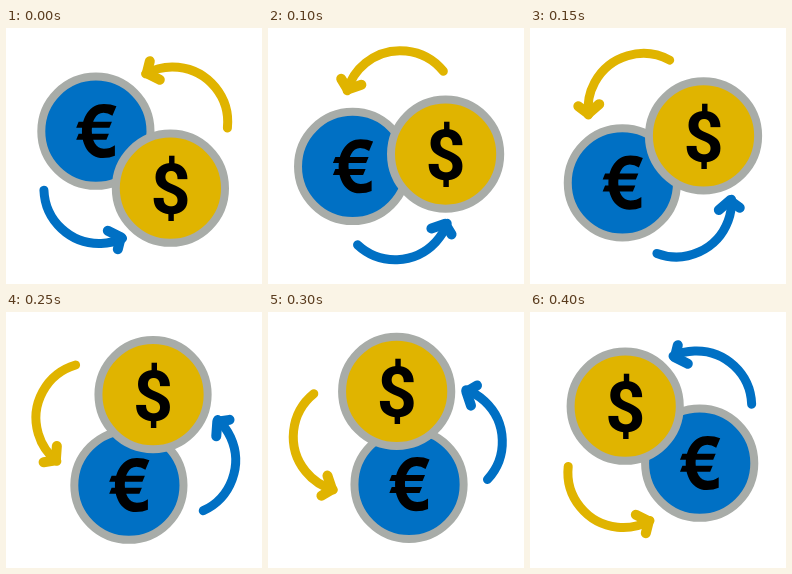
Recreate the animation shown at these times as an HTML page with a canvas. Size 256 by 256 pixels, loop 0.45 s.

```html
<!DOCTYPE html>
<html lang="en">
<head>
<meta charset="utf-8">
<title>Currency exchange</title>
<style>
  html, body { margin: 0; width: 100%; height: 100%; overflow: hidden; background: #fff; }
  canvas { display: block; width: 256px; height: 256px; }
</style>
</head>
<body>
<canvas id="stage" width="256" height="256"></canvas>
<script>
const ctx = document.getElementById('stage').getContext('2d');
const BLUE = '#0070c4', YELLOW = '#e0b400', GREY = '#a8aca8';
const PIVOT = { x: 129.8, y: 127.2 };
const STEP_MS = 50, STEPS = 9, STEP_ANGLE = -Math.PI / 8;

// Slanted euro sign around (0, 0): an open ring and two bars.
const EURO = new Path2D(`
  M20.5 -25 L16.5 -15.5 Q12 -18.5 7.5 -18.5 C-8 -18.5 -8 17.5 8 17.5 Q14 17.5 19 14
  V24.5 Q14 26.8 7 26.8 C-21 26.8 -21 -27.3 8 -27.3 Q15 -27.3 20.5 -25 Z
  M-17.3 -9.5 H16 L13.5 -3.5 H-19.7 Z
  M-17.3 2.5 H13 L10.5 8.5 H-19.7 Z`);

// Arc and head in coordinates relative to the pivot, pointing up left.
function drawArrow(color, angle, endAngle, tipAngle, headX) {
  const rad = Math.PI / 180;
  ctx.save();
  ctx.translate(PIVOT.x, PIVOT.y);
  ctx.rotate(angle);
  ctx.strokeStyle = color;
  ctx.lineWidth = 9;
  ctx.lineCap = ctx.lineJoin = 'round';
  ctx.beginPath();
  ctx.arc(36.6, -33, 55.3, endAngle * rad, tipAngle * rad, true);
  ctx.stroke();
  ctx.translate(headX, 0);
  ctx.lineWidth = 10;
  ctx.beginPath();
  ctx.moveTo(14, -94);
  ctx.lineTo(11, -82);
  ctx.lineTo(24, -75.5);
  ctx.stroke();
  ctx.restore();
}

function drawDollar() {
  ctx.font = 'bold 70px Roboto, sans-serif';
  const box = ctx.measureText('$');
  ctx.fillText('$',
    (box.actualBoundingBoxLeft - box.actualBoundingBoxRight) / 2,
    (box.actualBoundingBoxAscent - box.actualBoundingBoxDescent) / 2);
}

// The coin circles the pivot while its symbol stays upright.
function drawCoin(color, drawSymbol, angle, dx, dy) {
  const cos = Math.cos(angle), sin = Math.sin(angle);
  ctx.save();
  ctx.translate(PIVOT.x + dx * cos - dy * sin, PIVOT.y + dx * sin + dy * cos);
  ctx.beginPath();
  ctx.arc(0, 0, 54.6, 0, Math.PI * 2);
  ctx.fillStyle = color;
  ctx.fill();
  ctx.strokeStyle = GREY;
  ctx.lineWidth = 8;
  ctx.stroke();
  ctx.fillStyle = '#000';
  drawSymbol();
  ctx.restore();
}

const start = performance.now();
function draw() {
  const elapsed = Math.max(0, performance.now() - start);
  const angle = Math.floor(elapsed / STEP_MS) % STEPS * STEP_ANGLE;
  ctx.fillStyle = '#fff';
  ctx.fillRect(0, 0, 256, 256);
  drawArrow(YELLOW, angle, 6, -119, 0);
  drawArrow(BLUE, angle + Math.PI, -2, -115, 4);
  drawCoin(BLUE, () => ctx.fill(EURO), angle, -39.9, -24);
  drawCoin(YELLOW, drawDollar, angle, 34.6, 33);
  requestAnimationFrame(draw);
}
draw();
</script>
</body>
</html>
```
